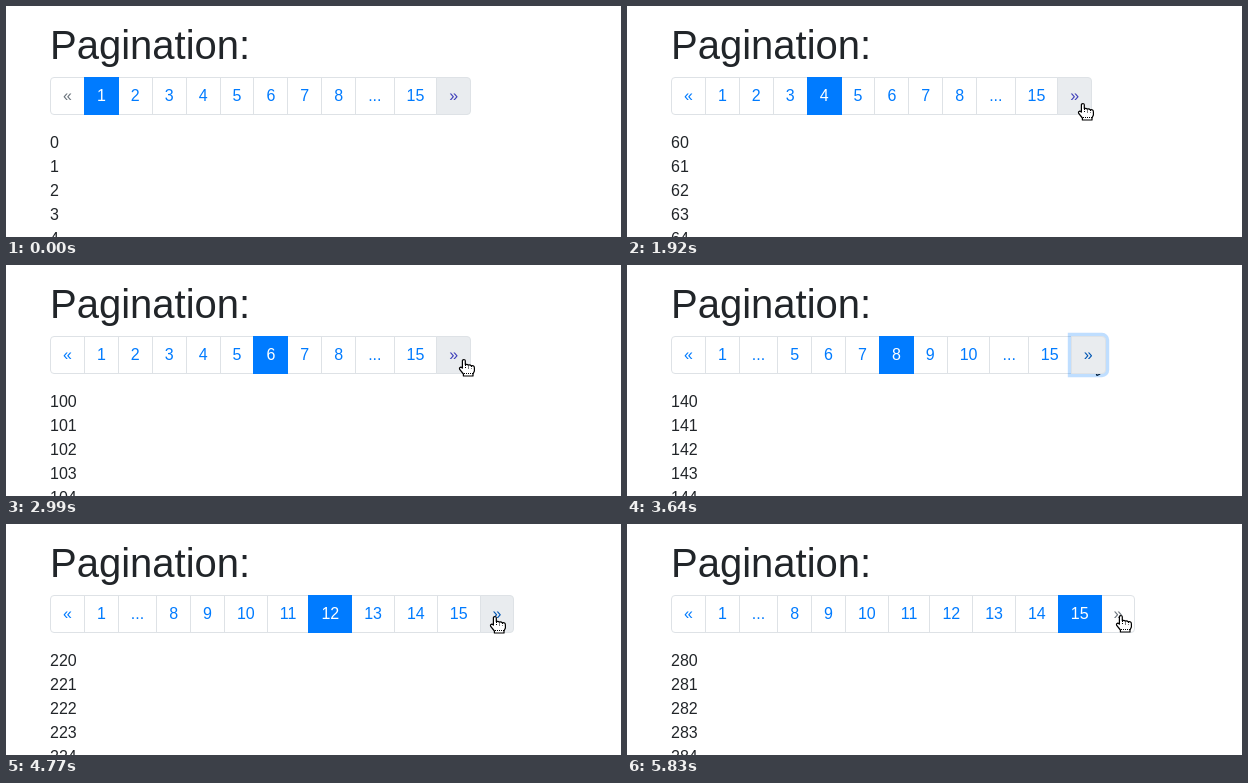
Recreate the animation shown at these times as an HTML page. Size 615 by 231 pixels, loop 6740 ms.

```html
<!DOCTYPE html>
<html lang="en">
<head>
<meta charset="utf-8">
<title>Pagination</title>
<style>
* { box-sizing: border-box; }
html, body { margin: 0; width: 615px; height: 231px; overflow: hidden; background: #fff; }
body { position: relative; font: 16px/24px "Liberation Sans", Arial, sans-serif; color: #212529; }
h1 { position: absolute; left: 44px; top: 15px; margin: 0; font-size: 40px; font-weight: 400; line-height: 48px; }
#pager { position: absolute; left: 44px; top: 71px; display: flex; }
#pager span {
  position: relative; padding: 8px 12px; margin-left: -1px; line-height: 20px;
  border: 1px solid #dee2e6; background: #fff; color: #007bff; white-space: nowrap;
}
#pager span:first-child { margin-left: 0; border-radius: 4px 0 0 4px; }
#pager span:last-child { border-radius: 0 4px 4px 0; }
#pager .active { z-index: 1; color: #fff; background: #007bff; border-color: #007bff; }
#pager .hover { color: #0056b3; background: #e9ecef; }
#pager .early { color: #3f3fba; }
#pager .focus { z-index: 2; box-shadow: 0 0 0 3.2px rgba(0, 123, 255, .25); }
#pager .disabled { color: #6c757d; }
#rows { position: absolute; left: 44px; top: 125px; white-space: pre; }
svg { position: absolute; left: 0; top: 0; overflow: visible; }
svg path { fill: #fff; stroke: #000; stroke-width: 1.2; stroke-linejoin: round; }
svg .dots { fill: none; stroke-width: 1; stroke-dasharray: 1 1; }
</style>
</head>
<body>
<h1>Pagination:</h1>
<div id="pager"></div>
<div id="rows"></div>
<svg id="cursor" width="20" height="22">
  <path id="arrow" d="M.6 .6V17L4.4 13.5L7 19.4L9.8 18.2L7.2 12.4H12Z"/>
  <g id="hand">
    <path d="M-1.6 9V1.8Q-1.6 .6-.2 .6Q1.3 .6 1.3 1.8V5.6Q3 4.8 4.3 6Q6.2 5.4 7.3 6.8Q10.4 6.2 10.4 9V12L9 15V17H-.6V15L-4.3 10.4Q-5 8.8-3.6 8.2Q-2.4 8.2-1.6 9Z"/>
    <path class="dots" d="M1.5 6V9.5M4.5 6.5V9.5M7.5 7V9.5M0 14.5H9"/>
  </g>
</svg>
<script>
const LOOP = 6740, LAST = 15, PER_PAGE = 20;
// press time, release time (next page opens), pointer x, y
const clicks = [
  [630, 760, 458, 97], [1330, 1410, 458, 97], [1800, 1880, 457, 97],
  [2180, 2290, 455, 96], [2560, 2750, 455, 96], [3240, 3320, 458, 94],
  [3440, 3520, 461, 92], [3640, 3680, 463, 91], [3880, 3930, 466, 91],
  [4280, 4370, 482, 90], [4590, 4690, 487, 91], [4910, 5040, 490, 92],
  [5200, 5330, 493, 92], [5650, 5740, 494, 91]
];
// time needed to drift to the next press position
const DRIFT = 130;
const $ = id => document.getElementById(id);
const range = (a, b) => Array.from({ length: b - a + 1 }, (_, i) => a + i);

function pageItems(page) {
  if (page <= 6) return [...range(1, 8), "...", LAST];
  if (page >= LAST - 4) return [1, "...", ...range(LAST - 7, LAST)];
  return [1, "...", ...range(page - 3, page + 2), "...", LAST];
}

function cell(text, cls = "") {
  return `<span class="${cls}">${text}</span>`;
}

function drawPage(page, pressed) {
  const hover = "hover" + (page < 7 ? " early" : "") + (pressed ? " focus" : "");
  $("pager").innerHTML =
    cell("«", page === 1 ? "disabled" : "") +
    pageItems(page).map(n => cell(n, n === page ? "active" : "")).join("") +
    cell("»", page === LAST ? "disabled" : hover);
  const first = (page - 1) * PER_PAGE;
  $("rows").textContent = range(first, first + 4).join("\n");
}

function pointerAt(t, done) {
  const next = clicks[done], prev = clicks[done - 1];
  if (!next) return prev.slice(2);
  if (!prev || t >= next[0]) return next.slice(2);
  const k = Math.min(1, (t - prev[1]) / DRIFT);
  return [2, 3].map(i => Math.round(prev[i] + (next[i] - prev[i]) * k));
}

let shown = "";
function frame() {
  const t = performance.now() % LOOP;
  const done = clicks.filter(c => t >= c[1]).length;
  const pressed = done < clicks.length && t >= clicks[done][0];
  const key = done + "," + pressed;
  if (key !== shown) {
    shown = key;
    drawPage(done + 1, pressed);
    $("arrow").style.display = pressed ? "" : "none";
    $("hand").style.display = pressed ? "none" : "";
    $("cursor").style.display = done || pressed ? "" : "none";
  }
  const [x, y] = pointerAt(t, done);
  $("cursor").style.transform = `translate(${x}px, ${y}px)`;
  requestAnimationFrame(frame);
}
frame();
</script>
</body>
</html>
```
